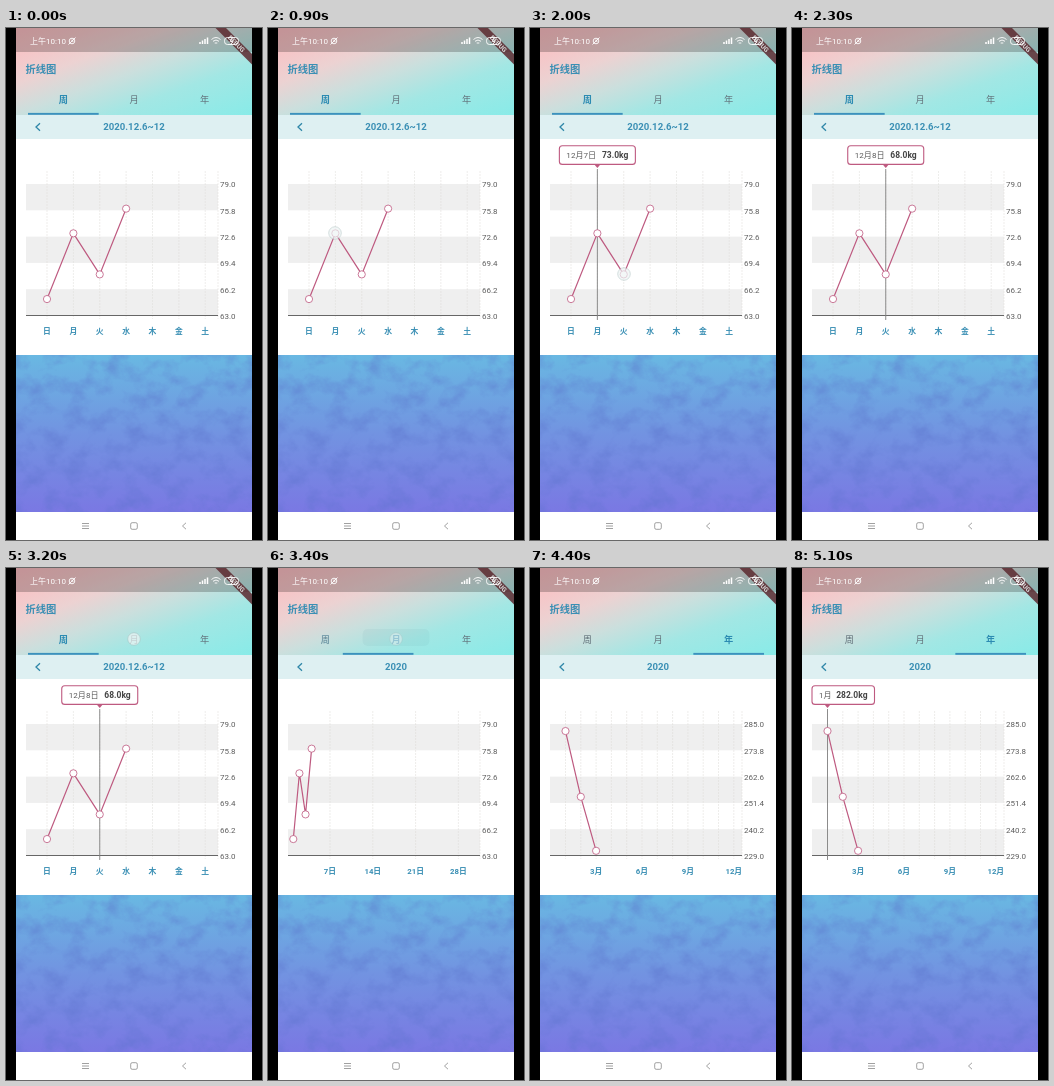
These frames come from a looping animation (256 px wide and 512 px high, 7200 ms). An HTML page:

```html
<!DOCTYPE html>
<html lang="zh">
<head>
<meta charset="utf-8">
<style>
  html, body { margin: 0; width: 100%; height: 100%; overflow: hidden; background: #000; }
  svg { display: block; width: 100%; height: 100%; font-family: Roboto, 'Noto Sans CJK SC', 'Noto Sans CJK JP', sans-serif; }
</style>
</head>
<body>
<svg viewBox="0 0 256 512">
  <defs>
    <linearGradient id="header" gradientUnits="userSpaceOnUse" x1="99.8" y1="-33.1" x2="156.2" y2="120.1">
      <stop stop-color="#fabcc0"/><stop offset=".15" stop-color="#f6c5c7"/><stop offset=".32" stop-color="#ecd2d2"/>
      <stop offset=".5" stop-color="#cbdfdd"/><stop offset=".7" stop-color="#a2e7e4"/><stop offset="1" stop-color="#88ebe8"/>
    </linearGradient>
    <linearGradient id="sea" x2="0" y2="1">
      <stop stop-color="#69b8e2"/><stop offset=".5" stop-color="#7293e1"/><stop offset="1" stop-color="#7a78e3"/>
    </linearGradient>
    <filter id="paint" x="0" y="0" width="1" height="1" color-interpolation-filters="sRGB">
      <feTurbulence type="fractalNoise" baseFrequency=".05 .06" numOctaves="4" seed="7"/>
      <feColorMatrix values="0 0 0 0 .36  0 0 0 0 .45  0 0 0 0 .8  2 0 0 0 -.85"/>
    </filter>
    <clipPath id="screen"><rect x="10" width="236" height="512"/></clipPath>
  </defs>
  <g clip-path="url(#screen)">
    <rect x="10" width="236" height="512" fill="#fff"/>
    <rect x="10" width="236" height="87" fill="url(#header)"/>
    <rect x="10" width="236" height="24" opacity=".22"/>
    <g transform="translate(246 0) rotate(45)">
      <rect x="-27" y="18.4" width="54" height="7.4" fill="#5c2a2f" opacity=".85"/>
      <text y="24.4" font-size="6.5" font-weight="700" fill="#ddd" text-anchor="middle">DEBUG</text>
    </g>
    <rect x="10" y="87" width="236" height="24" fill="#def0f2"/>
    <rect x="10" y="327" width="236" height="157" fill="url(#sea)"/>
    <rect x="10" y="327" width="236" height="157" filter="url(#paint)" opacity=".5"/>
    <g fill="none" stroke="#fff" stroke-width=".9">
      <text x="24" y="16" font-size="8" fill="#fff" stroke="none">上午10:10</text>
      <circle cx="66" cy="13" r="2.8"/><path d="M62.5 16.5L69.5 9.5M66 11.5V13.2H67.5"/>
      <path d="M194 16V14M196.5 16V12.5M199 16V11M201.5 16V9.5" stroke-width="1.5"/>
      <path d="M205.5 11.5Q210 7.5 214.5 11.5M207 13.3Q210 10.7 213 13.3M208.7 15H211.3"/>
      <rect x="218.5" y="9.5" width="14" height="7" rx="3"/>
      <path d="M226.5 9.8L224 13.3H227L225 16.3"/>
    </g>
    <text x="19.5" y="45" font-size="10.3" font-weight="700" fill="#3a8fb4">折线图</text>
    <path d="M34 95.3L30 99L34 102.7" fill="none" stroke="#2e86a8" stroke-width="1.3"/>
    <g fill="none" stroke="#8a8a8a" stroke-width=".8">
      <path d="M76 495.5H83M76 498H83M76 500.5H83M180 494.8L176.5 498L180 501.2"/>
      <rect x="124.7" y="494.7" width="6.6" height="6.6" rx="1.5"/>
    </g>
    <g id="live"></g>
  </g>
</svg>
<script>
const LOOP = 7200, TICK = 100;
const BLUE = '#3a8fb4', PINK = '#be5a80', GREY = '#5c5c5c';
const TOP = 156, ROW = 26.3, BASE = TOP + 5 * ROW, LEFT = 20, RIGHT = 212;
const TAB_W = 70.67, TAB_X = 22;
const live = document.getElementById('live');
const range = n => [...Array(n).keys()];
const clamp = v => Math.min(1, Math.max(0, v));

// x0 is the first slot, dx the slot spacing; labels are [slot, text]
const charts = [
  { title: '2020.12.6~12', x0: 41, dx: 26.37, min: 63, step: 3.2, values: [65, 73, 68, 76],
    grid: range(7), labels: [...'日月火水木金土'].map((d, i) => [i, d]) },
  { title: '2020', x0: 25.3, dx: 6.114, min: 63, step: 3.2, values: [65, 73, 68, 76],
    grid: [6, 13, 20, 27], labels: [7, 14, 21, 28].map(d => [d - 1, d + '日']) },
  { title: '2020', x0: 35.5, dx: 15.3, min: 229, step: 11.2, values: [282, 254, 231],
    grid: range(12), labels: [3, 6, 9, 12].map(m => [m - 1, m + '月']) }
];

const tips = [
  { from: 1000, to: 2100, slot: 1, date: '12月7日', value: '73.0kg', width: 76 },
  { from: 2100, to: 3300, slot: 2, date: '12月8日', value: '68.0kg', width: 76 },
  { from: 5000, to: LOOP, slot: 0, date: '1月', value: '282.0kg', width: 62.5 }
];

const touches = [
  { from: 900, to: 1200, x: 67, y: 205 },
  { from: 2000, to: 2300, x: 94, y: 246 },
  { from: 3200, to: 3500, x: 128, y: 71 },
  { from: 4100, to: 4300, x: 198.5, y: 66 },
  { from: 4900, to: 5100, x: 36, y: 164 }
];

const ripples = [{ from: 3300, to: 3700, tab: 1 }, { from: 4200, to: 4400, tab: 2 }];

const active = (list, t) => list.find(e => t >= e.from && t < e.to);
const slide = (t, start, length) => 1 - (1 - clamp((t - start) / length)) ** 2.3;

function text(x, y, size, color, str, { anchor = 'middle', weight = 400, opacity = 1 } = {}) {
  return `<text x="${x}" y="${y + size * .36}" font-size="${size}" fill="${color}" text-anchor="${anchor}" font-weight="${weight}" opacity="${opacity}">${str}</text>`;
}

function drawTabs(position) {
  const names = [...'周月年'].map((name, i) => {
    const on = clamp(1 - Math.abs(position - i)), x = TAB_X + TAB_W * (i + .5);
    return text(x, 72, 9.2, '#62717a', name, { opacity: 1 - on }) +
      text(x, 72, 9.2, '#2c8bb2', name, { weight: 700, opacity: on });
  });
  return names.join('') +
    `<rect x="${TAB_X + TAB_W * position}" y="84.9" width="${TAB_W}" height="1.9" fill="#3c91bd"/>`;
}

function drawChart(chart, tip) {
  const xAt = slot => chart.x0 + chart.dx * slot;
  const yAt = v => BASE - (v - chart.min) / chart.step * ROW;
  const points = chart.values.map((v, i) => [xAt(i), yAt(v)]);
  let out = text(128, 98.5, 9.6, BLUE, chart.title, { weight: 700 });
  for (const i of [0, 2, 4])
    out += `<rect x="${LEFT}" y="${TOP + i * ROW}" width="${RIGHT - LEFT}" height="${ROW}" fill="#efefef"/>`;
  for (const x of [...chart.grid.map(xAt), RIGHT])
    out += `<path d="M${x} 143V291" stroke="#dcdad6" stroke-width=".5" stroke-dasharray="2 1"/>`;
  for (const i of range(6))
    out += text(214, TOP + .5 + i * ROW, 8, GREY, (chart.min + chart.step * (5 - i)).toFixed(1), { anchor: 'start' });
  for (const [slot, label] of chart.labels)
    out += text(xAt(slot), 303, 7.8, BLUE, label, { weight: 700 });
  out += `<path d="M${LEFT} ${BASE}H${RIGHT}" stroke="#666" stroke-width="1"/>`;
  if (tip) out += `<path d="M${xAt(tip.slot)} 141V292" stroke="#808080" stroke-width=".9"/>`;
  out += `<polyline points="${points.join(' ')}" fill="none" stroke="${PINK}" stroke-width="1.2"/>`;
  for (const [x, y] of points)
    out += `<circle cx="${x}" cy="${y}" r="3.6" fill="#fff" stroke="${PINK}" stroke-width=".8"/>`;
  return out + (tip ? drawTip(tip, xAt(tip.slot)) : '');
}

function drawTip({ date, value, width }, x) {
  const left = Math.max(LEFT, x - width / 2), right = left + width;
  return `<rect x="${left}" y="117.7" width="${width}" height="18.7" rx="3" fill="#fff" stroke="${PINK}" stroke-width="1.1"/>` +
    `<path d="M${x - 3} 136.5H${x + 3}L${x} 140Z" fill="${PINK}"/>` +
    text(left + 7, 127, 8.1, GREY, date, { anchor: 'start' }) +
    text(right - 7, 127, 8.5, '#444', value, { anchor: 'end', weight: 700 });
}

function drawRipple({ from, to, tab }, t) {
  const age = (t - from) / (to - from);
  return `<rect x="${TAB_X + TAB_W * tab + 2}" y="61" width="${TAB_W - 4}" height="17" rx="5" fill="#508c91" opacity="${.1 * (1 - age)}"/>`;
}

function drawTouch({ from, to, x, y }, t) {
  const fade = 1 - .5 * (t - from) / (to - from);
  return `<circle cx="${x}" cy="${y}" r="6.3" fill="#eef5f5" stroke="#9fb5b5" stroke-width=".6" opacity="${.7 * fade}"/>`;
}

function draw(t) {
  const position = slide(t, 3265, 300) + slide(t, 4130, 260);
  const chart = charts[t < 3300 ? 0 : t < 4200 ? 1 : 2];
  const ripple = active(ripples, t), touch = active(touches, t);
  live.innerHTML = (ripple ? drawRipple(ripple, t) : '') + drawTabs(position) +
    drawChart(chart, active(tips, t)) + (touch ? drawTouch(touch, t) : '');
}

let shown = -1;
const start = performance.now();
function frame() {
  const t = Math.floor((performance.now() - start) % LOOP / TICK) * TICK;
  if (t !== shown) draw(shown = t);
  requestAnimationFrame(frame);
}
frame();
</script>
</body>
</html>
```
